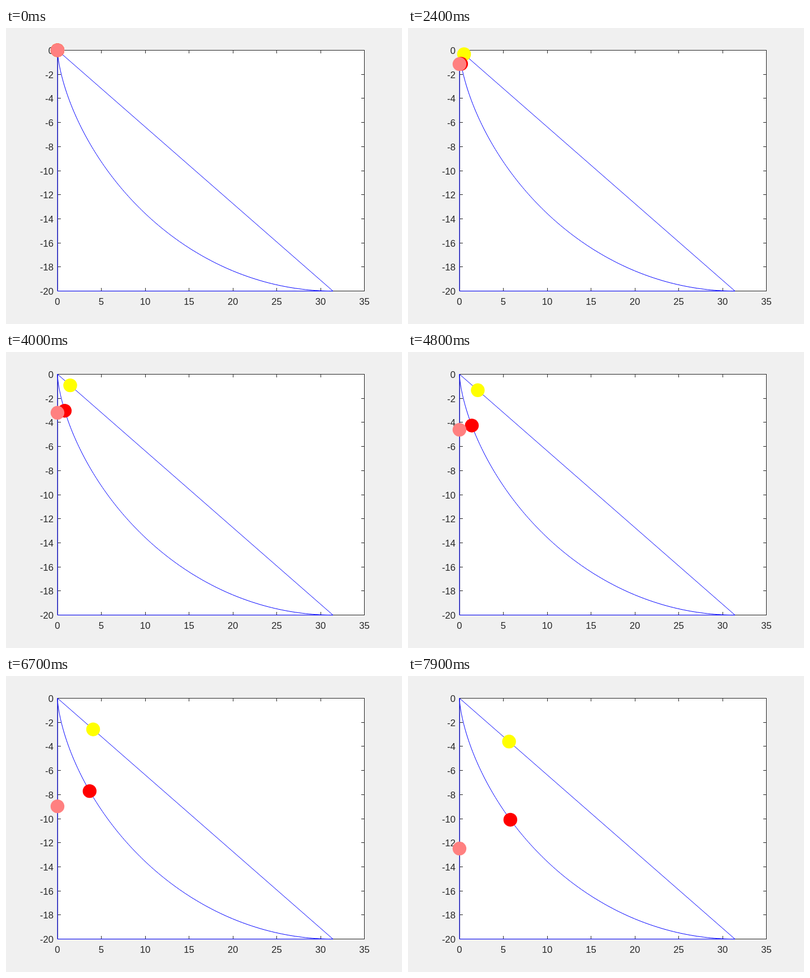
Recreate the animation shown at these times as an HTML page with a canvas. Size 700 px wide and 525 px high, loop 8 s.

```html
<!DOCTYPE html>
<html>
<head>
<meta charset="utf-8">
<style>
html, body { margin: 0; width: 100%; height: 100%; overflow: hidden; background: #f0f0f0; }
canvas { display: block; }
</style>
</head>
<body>
<canvas id="stage" width="700" height="525"></canvas>
<script>
const ctx = document.getElementById('stage').getContext('2d');
const R = 10, END = Math.PI * R;
const STEP = 100, STEPS = 80;
const SLOPE = 400 / (400 + END * END); // squared sine of the incline

const px = x => 91 + 15.5 * x;
const py = y => 39.4 - 21.36 * y;
const cycloid = a => [R * (a - Math.sin(a)), R * (Math.cos(a) - 1)];

function rect(x, y, w, h) {
  ctx.fillRect(Math.floor(x), Math.floor(y), w, h);
}

function drawAxes() {
  ctx.fillStyle = '#f0f0f0';
  ctx.fillRect(0, 0, 700, 525);
  ctx.fillStyle = '#fff';
  ctx.fillRect(91, 39, 543, 428);

  ctx.fillStyle = '#262626';
  rect(91, 39, 543, 1);
  rect(91, 466, 543, 1);
  rect(91, 39, 1, 428);
  rect(633, 39, 1, 428);

  ctx.font = '16.67px "Liberation Sans", Arial, sans-serif';
  ctx.textAlign = 'center';
  for (let x = 0; x <= 35; x += 5) {
    rect(px(x), 39, 1, 6);
    rect(px(x), 461, 1, 6);
    ctx.fillText(x, px(x), 491);
  }
  ctx.textAlign = 'right';
  for (let y = 0; y >= -20; y -= 2) {
    rect(91, py(y), 6, 1);
    rect(628, py(y), 6, 1);
    ctx.fillText(y, 84, Math.round(py(y) + 6.5));
  }
}

function drawPaths() {
  ctx.strokeStyle = '#00f';
  ctx.lineWidth = 1;
  ctx.beginPath();
  ctx.moveTo(px(END), py(-20));
  ctx.lineTo(px(0), py(0));
  ctx.lineTo(px(0), py(-20));
  ctx.lineTo(px(END), py(-20));
  ctx.moveTo(px(0), py(0));
  for (let i = 1; i <= 160; i++) {
    const [x, y] = cycloid(Math.PI * i / 160);
    ctx.lineTo(px(x), py(y));
  }
  ctx.stroke();
}

function ball(x, y, color) {
  ctx.fillStyle = color;
  ctx.beginPath();
  ctx.arc(px(x), py(y), 12.2, 0, 2 * Math.PI);
  ctx.fill();
}

function draw(now) {
  const t = 0.02 * (Math.floor(now / STEP) % STEPS);
  const fall = 5 * t * t;
  drawAxes();
  drawPaths();
  ball(fall * SLOPE * END / 20, -fall * SLOPE, '#ff0');
  ball(...cycloid(t), '#f00');
  ball(0, -fall, '#ff8080');
}

const start = performance.now();
function tick() {
  draw(performance.now() - start);
  requestAnimationFrame(tick);
}
tick();
</script>
</body>
</html>
```
